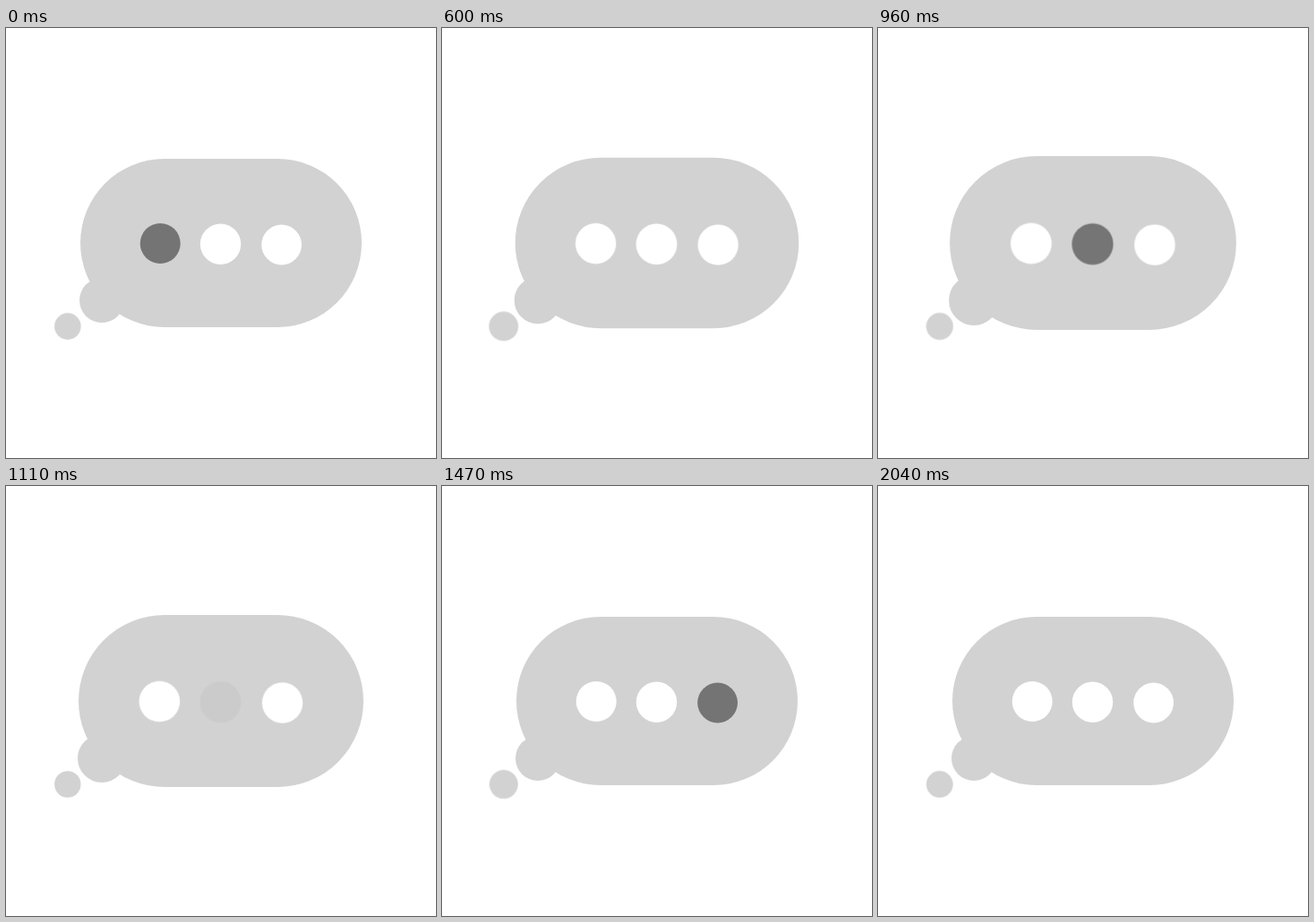
Write an HTML page that moves like this. It is 480 by 480 pixels and loops after 2.07 s.

```html
<!DOCTYPE html>
<html lang="en">
<head>
<meta charset="utf-8">
<title>Typing bubble</title>
<style>
  html, body { margin: 0; width: 100%; height: 100%; overflow: hidden; background: #fff; }
  svg { display: block; width: 100vw; height: 100vh; }

  .bubble, .speck { fill: #d2d2d2; }
  .bubble { stroke: #d2d2d2; animation: swell 2070ms linear infinite; }
  .dots { fill: #fff; transform-origin: 240px 240px; animation: spread 2070ms linear infinite; }
  .one { animation: blink-one 2070ms linear infinite; }
  .two { animation: blink-two 2070ms linear infinite; }
  .three { animation: blink-three 2070ms linear infinite; }
  .speck {
    transform-origin: 68.8px 333px;
    animation: pulse 517.5ms ease-in-out -942.5ms infinite alternate;
  }

  /* The outline grows evenly on all sides */
  @keyframes swell {
    0%, 16.908% { stroke-width: 0; }
    45.411% { stroke-width: 6px; }
    70.048%, 100% { stroke-width: 0; }
  }
  @keyframes spread {
    0%, 16.908% { transform: scale(1); }
    45.411% { transform: scale(1.02); }
    70.048%, 100% { transform: scale(1); }
  }
  @keyframes pulse {
    from { transform: scale(1); }
    to { transform: scale(1.115); }
  }

  /* Each dot turns dark at once, holds, then fades back to white */
  @keyframes blink-one {
    0%, 17.391% { fill: #747474; }
    28.986%, 100% { fill: #fff; }
  }
  @keyframes blink-two {
    0%, 30.42% { fill: #fff; }
    30.43%, 46.377% { fill: #747474; }
    57.971%, 100% { fill: #fff; }
  }
  @keyframes blink-three {
    0%, 58.93% { fill: #fff; }
    58.94%, 75.362% { fill: #747474; }
    86.957%, 100% { fill: #fff; }
  }
</style>
</head>
<body>
<svg viewBox="0 0 480 480">
  <g class="bubble">
    <rect x="83" y="146" width="314" height="188" rx="94"/>
    <circle cx="107" cy="304" r="25"/>
  </g>
  <circle class="speck" cx="68.8" cy="333" r="14.7"/>
  <g class="dots">
    <circle class="one" cx="172.2" cy="240.5" r="22.5"/>
    <circle class="two" cx="239.5" cy="241.2" r="22.7"/>
    <circle class="three" cx="307.6" cy="242" r="22.4"/>
  </g>
</svg>
</body>
</html>
```
